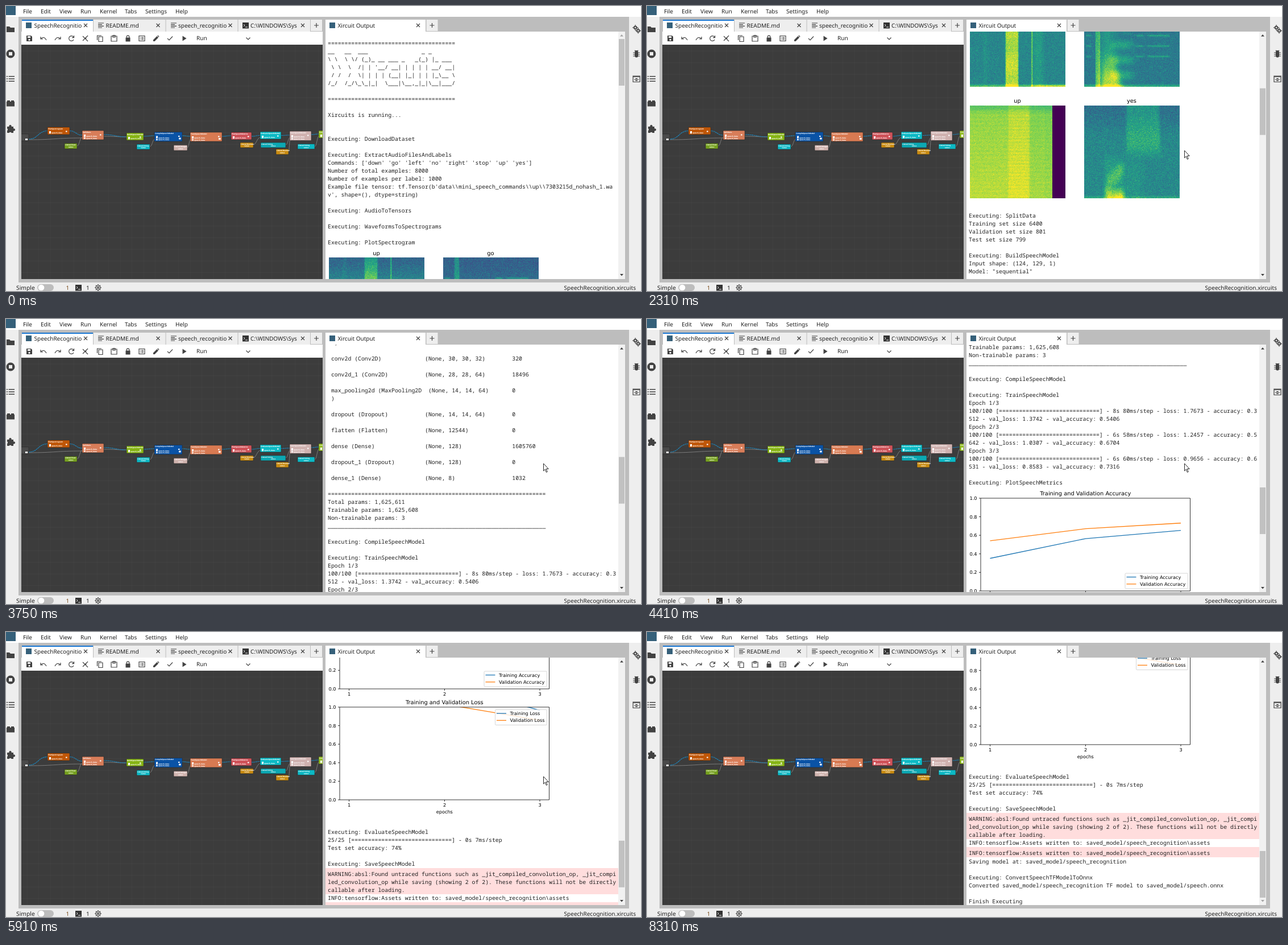
These frames come from a looping animation (1117x501 px, 8360 ms). An HTML page with a canvas:

```html
<!DOCTYPE html>
<html lang="en">
<head>
<meta charset="utf-8">
<title>Speech workflow run</title>
<style>
html, body { margin: 0; width: 1117px; height: 501px; overflow: hidden; background: #bdbdbd; }
svg, canvas, #panel, #page { position: absolute; left: 0; top: 0; }
#panel { left: 562px; top: 45px; width: 515px; height: 435px; overflow: hidden; background: #fff; }
#page { left: -562px; }
text { white-space: pre; text-rendering: geometricPrecision; }
.ui { font: 10px "Noto Sans", "Open Sans", sans-serif; fill: #212121; }
.out { font: 9.834px "Noto Sans Mono", "DejaVu Sans Mono", monospace; fill: #212121; }
.plot { font: 8.2px "DejaVu Sans", sans-serif; fill: #000; }
.head { font-size: 9.84px; text-anchor: middle; }
.tiny { font: bold 3.1px "Noto Sans", sans-serif; fill: #fff; }
.line { fill: none; stroke: #424242; stroke-width: 1.2; }
</style>
</head>
<body>
<svg id="app" width="1117" height="501"></svg>
<div id="panel"><div id="page"><svg id="doc" width="1117" height="2260"></svg></div></div>
<svg id="top" width="1117" height="501"></svg>
<script>
const LOOP = 8360;
const $ = id => document.getElementById(id);
const rect = (x, y, w, h, fill, extra = '') =>
  `<rect x="${x}" y="${y}" width="${w}" height="${h}" fill="${fill}" ${extra}/>`;
const text = (x, y, s, cls, extra = '') =>
  `<text xml:space="preserve" x="${x}" y="${y}" class="${cls}" ${extra}>${s}</text>`;
const path = (d, stroke, w = 1, extra = '') =>
  `<path d="${d}" fill="none" stroke="${stroke}" stroke-width="${w}" ${extra}/>`;
const shape = (x, y, d, cls = '') =>
  `<path transform="translate(${x} ${y})" d="${d}" ${cls ? `class="${cls}"` : 'fill="#424242"'} fill-rule="evenodd"/>`;
const circle = r => `M${-r} 0a${r} ${r} 0 1 0 ${2 * r} 0a${r} ${r} 0 1 0 ${-2 * r} 0z`;

// ---- application frame ----
const CROSS = 'M-3-3L3 3M3-3L-3 3';
const PLUS = 'M-4 0H4M0-4V4';
const LIST = 'M-5-4H5M-5-1.3H2M-5 1.4H5M-5 4H2';
const LOGO = '#35607a';
const BAR = '#eee';

function terminalIcon(x, y) {
  return rect(x - 5, y - 5, 11, 10.5, '#333') + path(`M${x - 3} ${y - 2}l2 2l-2 2M${x} ${y + 3}h4`, '#fff', .9);
}

function tab(x, w, label, icon, active) {
  return rect(x, 24, w, 21, active ? '#fff' : BAR) +
    (active === 2 ? rect(x, 24, w, 2, '#1976d2') : '') + icon +
    shape(x + w - 13, 34, CROSS, 'line') + text(x + 21.5, 38, label, 'ui');
}

function chrome() {
  const menu = { File: 30, Edit: 61, View: 94, Run: 131, Kernel: 165, Tabs: 209, Settings: 245, Help: 298 };
  const gear = circle(3.2) + circle(1.3) + 'M-.8-4.8h1.6v2h-1.6zM-.8 2.8h1.6v2h-1.6zM-4.8-.8h2v1.6h-2zM2.8-.8h2v1.6h-2z';
  let s = rect(0, 0, 1117, 19, '#fff') + rect(0, 0, 17, 16, LOGO);
  for (const name in menu) s += text(menu[name], 12.5, name, 'ui');
  s += rect(0, 19, 22, 468, BAR) + rect(1096, 19, 21, 468, BAR) + rect(0, 486, 1117, 15, BAR);

  s += tab(28, 125, 'SpeechRecognitio', rect(35, 29, 10, 10, LOGO), 2);
  s += tab(154, 126.5, 'README.md', shape(167, 34, LIST, 'line'));
  s += tab(281.5, 126, 'speech_recognitio', shape(295, 34, LIST, 'line'));
  s += tab(408.5, 126.5, 'C:\\WINDOWS\\Sys', terminalIcon(421, 34));
  s += tab(562, 176, 'Xircuit Output', rect(569, 29, 10, 10, LOGO), 1);
  for (const x of [546, 749.5]) s += rect(x - 10, 24, 20, 20, BAR) + shape(x, 34, PLUS, 'line');

  s += rect(27, 45, 530, 24, '#fff') + text(335, 59.5, 'Run', 'ui');
  const undo = 'M-5-3V1H-1M-5 1Q1-5 5 3';
  const redo = 'M5-3V1H1M5 1Q-1-5-5 3';
  const outlined = [
    [66, undo], [91, redo],
    [115, 'M4-2A4.4 4.4 0 1 0 4 2M4.5-5V-1.4H1'],
    [140, 'M-5-4L4 5M-5 4L4-5' + circle(.8)],
    [165, 'M-4.5 3V-5H3M-2-3H5V5.5H-2z'],
    [190, 'M-5-4H5V5H-5zM-2-5.5H2V-2H-2z'],
    [239, 'M-5-4.5H5V4.5H-5zM-3-2H-2M-1-2H3M-3 0H-2M-1 0H3M-3 2H-2M-1 2H3'],
    [288.5, 'M-4.5 0L-1.5 3L4.5-3.5'],
    [426, 'M-3.5-1.5L0 2L3.5-1.5']];
  const filled = [
    [41, 'M-5-5H3L5-3V5H-5zM-3-4V-1H2V-4zM-1.6 2.3a1.6 1.6 0 1 0 3.2 0a1.6 1.6 0 1 0-3.2 0z'],
    [214.5, 'M-4-1.5H4V5.5H-4zM-2.8-1.5V-3a2.8 2.8 0 0 1 5.6 0V-1.5H1.6V-3a1.6 1.6 0 0 0-3.2 0V-1.5z'],
    [264, 'M-5 5V2.5L1.5-4L4-1.5L-2.5 5zM2.2-4.7L3.3-5.6L5.5-3.4L4.6-2.2z'],
    [313.5, 'M-3-4.5L4 0L-3 4.5z']];
  for (const [x, d] of outlined) s += shape(x, 57, d, 'line');
  for (const [x, d] of filled) s += shape(x, 57, d);

  s += shape(8, 41, 'M-7-5H-2L0-3H7V5H-7z');
  s += shape(8, 84, circle(7.5) + 'M-3-3H3V3H-3z');
  s += shape(8, 128, 'M-7-5H-5V-3.5H-7zM-3.5-5H7V-3.5H-3.5zM-7-.7H-5V.7H-7zM-3.5-.7H7V.7H-3.5zM-7 3.5H-5V5H-7zM-3.5 3.5H7V5H-3.5z');
  s += shape(8, 171, 'M-7-3H-6V-5H-1V-3H1V-5H6V-3H7V5.5H-7z');
  s += shape(8, 216, 'M-6-4H-2.5a2.2 2.2 0 1 1 4 0H5V-.5a2.2 2.2 0 1 1 0 4V7H1.5a2.2 2.2 0 0 0-4 0H-6V3a2 2 0 0 0 0-3.6z');
  s += shape(1107, 38, gear) + shape(1112, 43.5, gear);
  s += shape(1109, 84, 'M-3-2a3 4 0 0 1 6 0V3a3 3.5 0 0 1-6 0z') + shape(1109, 84, 'M-6-2H6M-6 1H6M-6 4H6M-3-6L-1-4M3-6L1-4', 'line');
  s += shape(1109, 128, 'M-6-5H6V5.5H-6zM-6-3.7H6', 'line') + shape(1109, 129.5, circle(2.4) + 'M-4-.5H4V.5H-4z');

  s += text(18, 499, 'Simple', 'ui', 'style="font-size:10.3px"');
  s += rect(55, 489, 29, 12, '#bdbdbd', 'rx="6"') + `<circle cx="62" cy="495" r="5.3" fill="#fff"/>`;
  s += text(105.5, 499, '1', 'ui', 'style="fill:#7a4a1a"') + terminalIcon(127, 495) + text(141, 499, '1', 'ui');
  s += shape(162, 495, circle(4) + 'M-1.3-1.3H1.3V1.3H-1.3z', 'line') + shape(162, 495, 'M-6 0H-4M4 0H6M0-6V-4M0 4V6M-4-4L-3-3M4-4L3-3M-4 4L-3 3M4 4L3 3', 'line');
  return s + text(1108, 499, 'SpeechRecognition.xircuits', 'ui', 'text-anchor="end"');
}

// ---- node canvas ----
const curve = (x1, y1, x2, y2) => {
  const m = (x1 + x2) / 2;
  return `M${x1} ${y1}C${m} ${y1} ${m} ${y2} ${x2} ${y2}`;
};

function node(x, y, w, h, fill, title, ports) {
  let s = rect(x, y, w, h, fill, 'rx="1" stroke="#222" stroke-width=".5"') + text(x + 1, y + 3.9, title, 'tiny');
  if (!ports) return s + text(x + w / 2, y + h - 1.8, 'value', 'tiny', 'text-anchor="middle"');
  s += rect(x + 3, y + 7, 3, 2.2, '#fff') + rect(x + w - 7, y + 6.5, 2.5, 2, '#fff');
  for (let i = 0; i < ports; i++) {
    s += rect(x + 3, y + 9 + i * 3.3, 2.8, 2.3, '#fff') + text(x + 7, y + 11.3 + i * 3.3, 'speech_data', 'tiny');
  }
  return s + (w > 45 ? rect(x + w - 6, y + 10, 3.5, 3, '#fff') : '');
}

function graph() {
  let grid = '';
  for (let p = 10.2; p < 530; p += 20.5) {
    grid += `M${27 + p} 68V480`;
    if (p < 411) grid += `M27 ${69 + p}H557`;
  }
  const params = [[40, 235, 134, 232], [125, 246, 134, 231], [253, 247, 262, 234], [319, 249, 325, 234],
    [434, 244, 448, 231], [492, 244, 500, 231], [497, 256, 500, 233], [543, 247, 551, 228], [172, 229, 212, 230]];
  const flow = [[40, 234, 73, 219.5], [112, 219.5, 134, 227], [172, 226, 212, 230], [241, 229, 261, 228], [310, 228, 324, 229],
    [380, 229, 396, 228], [432, 229, 447, 227.5], [484, 227.5, 499, 227], [537, 226, 550, 225]];
  const join = list => list.map(l => curve(...l)).join('');
  return `<svg x="27" y="68" width="530" height="412" viewBox="27 68 530 412">` +
    rect(27, 68, 530, 412, '#3c3c3c') + path(grid, '#fff', .6, 'opacity=".06"') +
    path(join(params), '#8b8b8b', .8) + path(join(flow), '#1c86bd', 1.1, 'id="flow" stroke-dasharray="3 .6"') +
    node(5, 225, 35, 12, '#4a4a4a', '', 0) + rect(34, 233, 4, 3, '#fff') +
    node(73, 213, 39, 13, '#c05708', 'PlotSpectrogram', 1) +
    node(134, 219, 38, 16, '#d87d59', 'SplitData', 2) +
    node(103, 241.5, 22, 9.5, '#76a11f', 'Literal Float', 0) +
    node(212, 223, 30, 13, '#86b414', 'BuildSpeechModel', 1) +
    node(261, 221.5, 49, 16.5, '#0a53a6', 'CompileSpeechModel', 2) +
    node(230, 243, 23, 9, '#0cb8c4', 'Literal String', 0) +
    node(324, 222, 56, 16, '#d87a52', 'TrainSpeechModel', 2) +
    node(295, 244.5, 24, 9.5, '#d0b3ae', 'Literal Integer', 0) +
    node(396, 222, 36, 13, '#cf5259', 'PlotSpeechMetrics', 1) +
    node(412, 240, 23, 9, '#c98b11', 'Literal Boolean', 0) +
    node(447, 221, 37, 13, '#0cbac5', 'EvaluateSpeechModel', 1) +
    node(448, 240, 44, 9, '#0ca8b3', 'Literal String', 0) +
    node(499, 220, 38, 16.5, '#d0b2b0', 'SaveSpeechModel', 2) +
    node(475, 251.5, 22, 9.5, '#c98b11', 'Literal Boolean', 0) +
    node(513, 242.5, 30, 9, '#0cb8c4', 'Literal String', 0) +
    node(550, 219, 30, 13, '#93bd22', 'Convert', 1) + '</svg>';
}

// ---- output text ----
const rule = (c, n) => c.repeat(n);
const row = (name, dims, count) => ` ${name}`.padEnd(name.length > 26 ? 30 : 29).concat(dims).padEnd(55) + count;
const epoch = (n, time, loss, acc, rest) =>
  `Epoch ${n}/3\n100/100 [${rule('=', 30)}] - ${time}ms/step - loss: ${loss} - accuracy: ${acc}\n${rest}`;

const intro = rule('=', 38) + String.raw`
__   __  ___                _ _
\ \  \ \/ (_)_ __ ___ _   _(_) |_ ___
 \ \  \  /| | '__/ __| | | | | __/ __|
 / /  /  \| | | | (__| |_| | | |_\__ \
/_/  /_/\_\_|_|  \___|\__,_|_|\__|___/

${rule('=', 38)}

Xircuits is running...


Executing: DownloadDataset

Executing: ExtractAudioFilesAndLabels
Commands: ['down' 'go' 'left' 'no' 'right' 'stop' 'up' 'yes']
Number of total examples: 8000
Number of examples per label: 1000
Example file tensor: tf.Tensor(b'data\\mini_speech_commands\\up\\7303215d_nohash_1.wa
v', shape=(), dtype=string)

Executing: AudioToTensors

Executing: WaveformsToSpectrograms

Executing: PlotSpectrogram`;

const training = `Executing: SplitData
Training set size 6400
Validation set size 801
Test set size 799

Executing: BuildSpeechModel
Input shape: (124, 129, 1)
Model: "sequential"
${rule('_', 65)}
${row('Layer (type)', 'Output Shape', 'Param #')}
${rule('=', 65)}
${row('resizing (Resizing)', '(None, 32, 32, 1)', 0)}

${row('normalization (Normalizatio', '(None, 32, 32, 1)', 3)}
 n)

${row('conv2d (Conv2D)', '(None, 30, 30, 32)', 320)}

${row('conv2d_1 (Conv2D)', '(None, 28, 28, 64)', 18496)}

${row('max_pooling2d (MaxPooling2D', '(None, 14, 14, 64)', 0)}
 )

${row('dropout (Dropout)', '(None, 14, 14, 64)', 0)}

${row('flatten (Flatten)', '(None, 12544)', 0)}

${row('dense (Dense)', '(None, 128)', 1605760)}

${row('dropout_1 (Dropout)', '(None, 128)', 0)}

${row('dense_1 (Dense)', '(None, 8)', 1032)}

${rule('=', 65)}
Total params: 1,625,611
Trainable params: 1,625,608
Non-trainable params: 3
${rule('_', 65)}

Executing: CompileSpeechModel

Executing: TrainSpeechModel
${epoch(1, '8s 80', '1.7673', '0.3', '512 - val_loss: 1.3742 - val_accuracy: 0.5406')}
${epoch(2, '6s 58', '1.2457', '0.5', '642 - val_loss: 1.0307 - val_accuracy: 0.6704')}
${epoch(3, '6s 60', '0.9656', '0.6', '531 - val_loss: 0.8583 - val_accuracy: 0.7316')}

Executing: PlotSpeechMetrics`;

const evaluation = `Executing: EvaluateSpeechModel
25/25 [${rule('=', 30)}] - 0s 7ms/step
Test set accuracy: 74%

Executing: SaveSpeechModel`;

const warning = `WARNING:absl:Found untraced functions such as _jit_compiled_convolution_op, _jit_compi
led_convolution_op while saving (showing 2 of 2). These functions will not be directly
callable after loading.`;

const assets = String.raw`INFO:tensorflow:Assets written to: saved_model/speech_recognition\assets`;

const ending = `Saving model at: saved_model/speech_recognition

Executing: ConvertSpeechTFModelToOnnx
Converted saved_model/speech_recognition TF model to saved_model/speech.onnx

Finish Executing`;

const block = (y, s) => s.split('\n').map((l, i) => l && text(566, y + 3.4 + i * 14, l, 'out')).join('');

// ---- charts ----
function chart(top, name, train, valid, legendX, legendY) {
  const H = 163, xs = [603.5, 771.5, 939], id = 'clip' + name;
  const curveOf = v => 'M' + v.map((a, i) => `${xs[i]} ${top + H * (1 - a)}`).join('L');
  let s = text(771.3, top - 5, `Training and Validation ${name}`, 'plot head');
  s += `<clipPath id="${id}">${rect(587, top, 368.5, H, '#000')}</clipPath>`;
  s += `<g clip-path="url(#${id})">${path(curveOf(train), '#1f77b4', 1.3)}${path(curveOf(valid), '#ff7f0e', 1.3)}</g>`;
  let ticks = '';
  for (let i = 0; i <= 5; i++) {
    const y = top + H * (1 - i / 5);
    ticks += `M584 ${y}H587`;
    s += text(580.5, y + 3, (i / 5).toFixed(1), 'plot', 'text-anchor="end"');
  }
  xs.forEach((x, i) => {
    ticks += `M${x} ${top + H}v3`;
    s += text(x, top + H + 12.3, i + 1, 'plot', 'text-anchor="middle"');
  });
  s += path(ticks + `M587 ${top}H955.5V${top + H}H587z`, '#000', .8);
  s += rect(legendX, legendY, 951.5 - legendX, 27, '#fff', 'rx="1.6" fill-opacity=".8" stroke="#ccc" stroke-width=".8"');
  [['Training', '#1f77b4'], ['Validation', '#ff7f0e']].forEach(([kind, color], i) => {
    const y = legendY + 6.6 + i * 12.3;
    s += path(`M${legendX + 2.5} ${y}h17`, color, 1.3) + text(legendX + 26, y + 2.9, `${kind} ${name}`, 'plot');
  });
  return s;
}

// ---- spectrograms ----
const VIRIDIS = ['440154', '414487', '2a788e', '22a884', '7ad151', 'fde725']
  .map(h => [0, 2, 4].map(i => parseInt(h.slice(i, i + 2), 16)));

function viridis(v) {
  const p = Math.min(Math.max(v, 0), .999) * 5, i = Math.floor(p);
  return VIRIDIS[i].map((c, k) => c + (VIRIDIS[i + 1][k] - c) * (p - i));
}

const edge = (a, b, v) => { const k = Math.min(Math.max((v - a) / (b - a), 0), 1); return k * k * (3 - 2 * k); };
const band = (v, a, b, soft = .02) => edge(a - soft, a + soft, v) * (1 - edge(b - soft, b + soft, v));
const ripple = (y, n) => Math.sin(y * n * 6.283);

const sounds = [
  (x, y) => .33 + .13 * edge(0, .3, y) + band(x, .37, .505, .01) * (.2 + .16 * edge(.05, .3, y) + .1 * y + .03 * ripple(y, 3)) +
    band(x, .64, .655, .005) * .27 + band(x, .66, .76, .04) * .09 * edge(.15, .4, y) +
    band(x, .14, .18, .02) * .04 + edge(.96, .99, y) * (.25 + .2 * edge(.6, .75, x)),
  (x, y) => .31 + .1 * edge(0, .5, y) + band(x, .115, .165, .008) * (.18 + .14 * y) +
    band(x, .17, .28 + .1 * y * y, .06) * (.12 + .36 * edge(.5, 1, y)) * edge(.2, .4, y) +
    band(x, .28, .5, .08) * edge(.25, .6, y) * .08 * (1.3 + ripple(y, 6)) +
    (band(x, .54, .62) + band(x, .66, .89) + band(x, .02, .07)) * band(y, .18, .7) * .17 * Math.max(0, ripple(y - .193, 8.9)) ** 6 +
    edge(.96, .99, y) * .2,
  (x, y) => x > .858 ? -1 : .83 + .07 * y + band(x, .4, .62, .01) * (.06 + .015 * ripple(y, 30)) -
    band(x, .62, .78, .03) * .03 - band(x, .78, .86, .01) * .04 - .1 * (1 - edge(0, .1, y)) + .01 * ripple(y, 22),
  (x, y) => .37 + .1 * edge(0, .4, y) + band(x, .44, .78 + .04 * y, .025) * (1 - edge(.4, .62, y)) * .15 +
    band(x, .43, .6, .05) * edge(.5, .7, y) * .05 +
    band(x, .22, .41, .04) * edge(.5, .68, y) * (.16 + .08 * ripple(x + y, 3) + .3 * edge(.85, .96, y)) +
    edge(.96, .99, y) * .13];
const grain = [.1, .1, .06, .12];

function spectrogram(i) {
  const W = 168, H = 163, canvas = document.createElement('canvas');
  canvas.width = W;
  canvas.height = H;
  canvas.style.cssText = `left:${i % 2 ? 769 : 568}px;top:${i < 2 ? 442 : 638}px`;
  const ctx = canvas.getContext('2d'), img = ctx.createImageData(W, H);
  let seed = 17 + i;
  const random = () => (seed = seed * 16807 % 2147483647) / 2147483647;
  for (let p = 0; p < W * H; p++) {
    const noise = (random() + random() + random() ** 3 - 1.25) * grain[i];
    const v = sounds[i]((p % W) / W, Math.floor(p / W) / H) + noise;
    img.data.set([...viridis(v), 255], p * 4);
  }
  ctx.putImageData(img, 0, 0);
  $('page').append(canvas);
}

// ---- assembly ----
$('app').innerHTML = chrome() + graph();
$('doc').innerHTML = block(66, intro) +
  [[651.5, 437.5, 'up'], [852.5, 437.5, 'go'], [651.5, 633, 'up'], [852.5, 633, 'yes']]
    .map(([x, y, s]) => text(x, y, s, 'plot head')).join('') +
  block(832, training) +
  chart(1587, 'Accuracy', [.3512, .5642, .6531], [.5406, .6704, .7316], 841, 1719) +
  chart(1782, 'Loss', [1.7673, 1.2457, .9656], [1.3742, 1.0307, .8583], 860.5, 1786.5) +
  text(771.3, 1969, 'epochs', 'plot', 'text-anchor="middle"') +
  rect(562, 2065, 515, 46, '#fdd') + rect(562, 2125, 515, 18, '#fdd') +
  block(2002, evaluation) + block(2076, warning) + block(2118, assets) + block(2136, assets) + block(2151, ending);
for (let i = 0; i < 4; i++) spectrogram(i);
$('top').innerHTML = rect(1077, 45, 12, 435, '#f1f1f1') + rect(1078, 58, 10, 82, '#c1c1c1', 'id="thumb"') +
  '<path id="up" d="M1080 53.5L1083 50L1086 53.5z"/><path id="down" d="M1080 471L1083 474.5L1086 471z"/>' +
  '<path id="cursor" d="M.5 0V13L3.4 10.2L5.3 15.4L7.3 14.6L5.2 9.5H9.2z" fill="#fff" stroke="#111" stroke-width=".9"/>';

// ---- motion ----
const MAX_SCROLL = 1747;
const scrollKeys = [[0, 0], [1480, 0], [1630, 82], [2310, 463], [3000, 660], [4410, 1272], [5910, 1650], [6110, MAX_SCROLL], [LOOP, MAX_SCROLL]];
const cursorKeys = [[500, 1081, 478], [860, 1010, 375], [1250, 945, 254], [6880, 945, 254], [7040, 885, 318], [7300, 830, 480]];

function at(keys, t, k = 1) {
  const i = Math.max(1, keys.findIndex(key => key[0] >= t));
  const a = keys[i - 1], b = keys[i];
  return a[k] + (b[k] - a[k]) * (t - a[0]) / (b[0] - a[0]);
}

function draw(t) {
  const y = Math.round(at(scrollKeys, t));
  $('page').style.top = `${-45 - y}px`;
  $('thumb').setAttribute('y', 58 + y / 5.343);
  $('up').setAttribute('fill', y > 0 ? '#404040' : '#a3a3a3');
  $('down').setAttribute('fill', y < MAX_SCROLL ? '#404040' : '#a3a3a3');
  const shown = t >= 500 && t <= 7300;
  $('cursor').setAttribute('visibility', shown ? 'visible' : 'hidden');
  if (shown) $('cursor').setAttribute('transform', `translate(${at(cursorKeys, t)} ${at(cursorKeys, t, 2)})`);
  $('flow').setAttribute('stroke-dashoffset', -t / 1000 * 3.6);
}

const start = performance.now();
function tick() {
  draw((performance.now() - start) % LOOP);
  requestAnimationFrame(tick);
}
tick();
</script>
</body>
</html>
```
